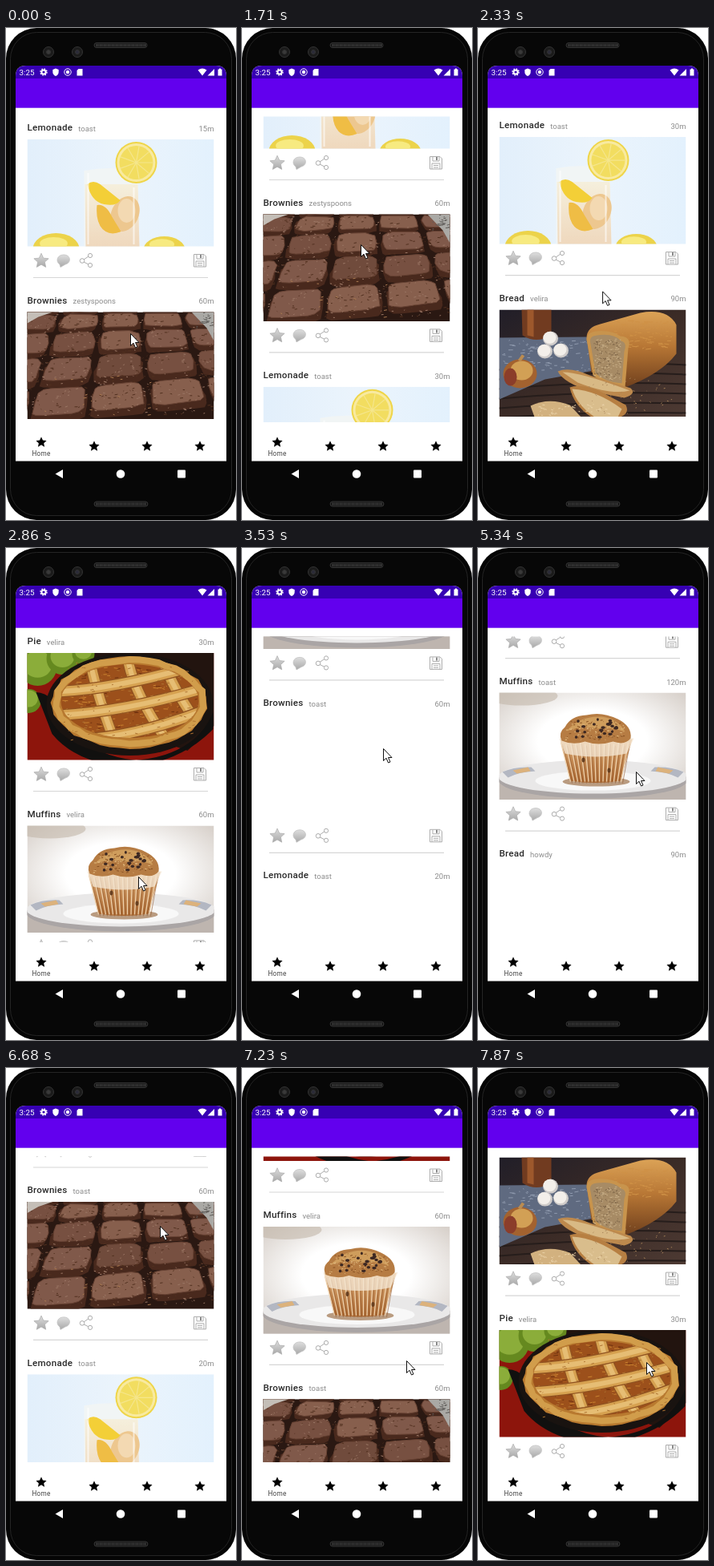
These frames come from a looping animation (287x614 px, 7990 ms). An HTML page:

```html
<!DOCTYPE html>
<html lang="en">
<head>
<meta charset="utf-8">
<title>Recipe feed</title>
<style>
  html, body { margin: 0; width: 100%; height: 100%; overflow: hidden; background: #fff; }
  svg { display: block; width: 287px; height: 614px; }
  text { font-family: Roboto, "Noto Sans", sans-serif; }
  .title { font-size: 11.6px; font-weight: 500; letter-spacing: .25px; fill: #2a2a2a; }
  .meta { font-size: 9.5px; font-weight: 400; letter-spacing: 0; fill: #8c8c8c; }
</style>
</head>
<body>
<svg viewBox="0 0 287 614" xmlns="http://www.w3.org/2000/svg">
  <defs>
    <clipPath id="listClip"><rect x="12" y="110.5" width="263" height="381.5"/></clipPath>
    <clipPath id="photoClip"><rect width="233" height="133.5"/></clipPath>
    <clipPath id="pieClip"><ellipse cx="128" cy="60" rx="86" ry="46"/></clipPath>
    <linearGradient id="silver" x2="0" y2="1"><stop stop-color="#dedede"/><stop offset="1" stop-color="#a8a8a8"/></linearGradient>
    <linearGradient id="sky"><stop stop-color="#e2effb"/><stop offset=".5" stop-color="#ebf4fc"/><stop offset="1" stop-color="#e3f1fd"/></linearGradient>
    <linearGradient id="drink" x2="0" y2="1"><stop stop-color="#f5efdc"/><stop offset="1" stop-color="#efd8bd"/></linearGradient>
    <radialGradient id="room" cy=".45" r=".65"><stop offset=".45" stop-color="#fff"/><stop offset="1" stop-color="#d8d1cb"/></radialGradient>
    <linearGradient id="wood" x2="1" y2="1"><stop stop-color="#211e28"/><stop offset=".5" stop-color="#3b2b26"/><stop offset="1" stop-color="#4d3a33"/></linearGradient>
    <linearGradient id="loaf" x2="0" y2="1"><stop stop-color="#dba256"/><stop offset=".45" stop-color="#b87735"/><stop offset="1" stop-color="#70401d"/></linearGradient>
    <linearGradient id="wrap" x2="0" y2="1"><stop stop-color="#dfae78"/><stop offset="1" stop-color="#a9662f"/></linearGradient>
    <path id="star" d="M0-1 .29-.36 .98-.29 .47 .17 .61 .85 0 .5-.61 .85-.47 .17-.98-.29-.29-.36Z"/>
    <g id="actions" fill="none" stroke="#adadad">
      <use href="#star" transform="translate(44 .5) scale(9.3)" fill="url(#silver)" stroke-width=".08"/>
      <path d="M67 5C62 2 63-7 72-7S82 3 74 5L68 8.5Z" fill="url(#silver)" stroke="#c2c2c2" stroke-width=".8"/>
      <path d="M97-1 103-5M97 2 103 5"/>
      <circle cx="95" cy=".5" r="2.8"/><circle cx="105" cy="-6" r="2.6"/><circle cx="105" cy="6" r="2.6"/>
      <path d="M234.500-7.500H247L249.500-5V8H234.500ZM238-7V-2H246V-7M237 8V1H247V8M239 3.500H245M239 6H245"/>
      <path d="M243-7V-3" stroke="#8a8a8a" stroke-width="2"/>
      <path d="M34 21.500H252" stroke="#d6d6d6" stroke-width="1.2"/>
    </g>
  </defs>

  <rect width="287" height="614" rx="38" fill="#050505"/>
  <rect x="5.500" y="5.500" width="276" height="603" rx="33" fill="#070707" stroke="#242424"/>
  <g fill="#1b1b1b" stroke="#333">
    <circle cx="53" cy="30" r="6.500"/><circle cx="89" cy="30" r="6.500"/>
    <circle cx="53" cy="30" r="2.500" fill="#3a3a3a"/><circle cx="89" cy="30" r="2.500" fill="#2b2b38"/>
    <rect x="110" y="18.500" width="66" height="6" rx="3"/><rect x="110" y="591" width="67" height="6" rx="3"/>
    <path d="M113 21.500H174M113 594H174" stroke="#484848" stroke-width="3" stroke-dasharray="1 1.5"/>
  </g>

  <path d="M12 540.500V60Q12 47 25 47H262Q275 47 275 60V540.500Z" fill="#fff"/>
  <path d="M12 63V60Q12 47 25 47H262Q275 47 275 60V63Z" fill="#3700b3"/>
  <rect x="12" y="63" width="263" height="36.700" fill="#6200ee"/>

  <g fill="#fff">
    <text x="16.500" y="58.600" font-size="9.800">3:25</text>
    <circle cx="47" cy="55" r="2.600" fill="none" stroke="#fff" stroke-width="2"/>
    <circle cx="47" cy="55" r="4" fill="none" stroke="#fff" stroke-width="1.500" stroke-dasharray="1.6 1.54"/>
    <path d="M62 50.500 65.700 52V55Q65.500 58.500 62 60 58.500 58.500 58.300 55V52Z"/>
    <circle cx="77" cy="55" r="4.200" fill="none" stroke="#fff"/><circle cx="77" cy="55" r="2.200"/>
    <path d="M90.500 51H95.500V59.500H88.500V53Z"/>
    <path d="M239.500 52.500Q245 48.500 250.500 52.500L245 59.500ZM251.500 59.500H260V51ZM264.500 51.500H266V50.500H268V51.500H269.500V59.500H264.500Z"/>
    <path d="M61.500 556.500 71 551V562Z"/><circle cx="143" cy="556.500" r="5.300"/><rect x="214" y="551.500" width="10" height="10" rx="1"/>
  </g>

  <g clip-path="url(#listClip)"><g id="feed"></g></g>
  <g id="tabs"></g>
  <text x="44" y="533.700" font-size="8.200" letter-spacing=".3" text-anchor="middle" fill="#444">Home</text>
  <path id="cursor" d="M.5 .5V15.500L4 12.200 6.500 18 9 17 6.500 11.500H11Z" fill="#fff" stroke="#111" stroke-linejoin="round"/>
</svg>

<script>
const LOOP = 7990, FIRST_BEAT = 645, BEAT = 130.3, PITCH = 215.4;
const $ = id => document.getElementById(id);
const lerp = (a, b, k) => a + (b - a) * k;
const smooth = k => k * k * (3 - 2 * k);

let seed = 7;
const rnd = () => (seed = seed * 16807 % 2147483647) / 2147483647;
const span = (a, b) => lerp(a, b, rnd());

const repeat = (n, make) => Array.from({ length: n }, (_, i) => make(i)).join('');
const oval = (x, y, rx, ry, fill, more = '') => `<ellipse cx="${x}" cy="${y}" rx="${rx}" ry="${ry}" fill="${fill}" ${more}/>`;
const shape = (d, fill, more = '') => `<path d="${d}" fill="${fill}" ${more}/>`;
const line = (d, color, width, more = '') => shape(d, 'none', `stroke="${color}" stroke-width="${width}" ${more}`);
const back = fill => shape('M0 0H233V134H0Z', fill);
const specks = (n, x0, y0, x1, y1, color, size) => line(
  repeat(n, () => `M${span(x0, x1).toFixed(1)} ${span(y0, y1).toFixed(1)}l${span(.5, size).toFixed(1)} ${span(-1, 1).toFixed(1)}`),
  color, 1);

// an ellipse with a ragged edge
function blob(x, y, rx, ry, rough, fill, more) {
  const points = Array.from({ length: 48 }, (_, i) => {
    const a = i / 48 * Math.PI * 2, r = span(1 - rough, 1 + rough);
    return `${(x + Math.cos(a) * rx * r).toFixed(1)} ${(y + Math.sin(a) * ry * r).toFixed(1)}`;
  });
  return shape(`M${points.join('L')}Z`, fill, more);
}

function lemonSlice(x, y, r) {
  const spokes = repeat(9, i => {
    const a = i * Math.PI * 2 / 9;
    return `M${x} ${y}l${(Math.cos(a) * r * .8).toFixed(1)} ${(Math.sin(a) * r * .8).toFixed(1)}`;
  });
  return oval(x, y, r, r, '#efd548') + oval(x, y, r - 2, r - 2, '#f8eaa0') +
    oval(x, y, r - 5, r - 5, '#f2dd60') + line(spokes, '#f5e68c', 1.2);
}

function lemonade() {
  const lemon = (x, y, rx, ry) => oval(x, y, rx, ry, '#ecd34a') + oval(x - 3, y - 7, rx * .6, ry * .4, '#f7ea80');
  return back('url(#sky)') + lemon(36, 137, 29, 20) + lemon(171, 138, 26, 17) +
    shape('M71 39Q104 33 138 39L140 134H71Z', '#f1f5f5') +
    shape('M72 56H138L140 134H73Z', 'url(#drink)') +
    oval(122, 93, 17, 23, '#edc78f', 'transform="rotate(25 122 93)"') + oval(124, 89, 11, 15, '#f3d9b2') +
    shape('M75 56Q82 50 91 56L116 76Q111 84 96 81 80 78 75 56Z', '#f3cf37') +
    shape('M87 82Q98 80 106 97L117 115Q103 121 94 112 85 102 87 82Z', '#efbd45') +
    line('M76 42V131M133 60V131', '#fff', 2, 'opacity=".6"') + lemonSlice(136, 29, 26);
}

function brownies() {
  const at = (u, v) => {
    const depth = (v / 5) ** 1.6, x = lerp(45 + u * 48, -4 + u * 78, depth);
    return [x, lerp(lerp(-7, 142, depth), lerp(-9, 118, depth), x / 233)];
  };
  const block = (u, v, r, fill, more) => {
    const points = Array.from({ length: 14 }, (_, i) => {
      const a = i / 14 * Math.PI * 2, square = n => Math.sign(n) * Math.abs(n) ** .4;
      const [x, y] = at(u + square(Math.cos(a)) * r, v + square(Math.sin(a)) * r * .9);
      return `${(x + span(-1.8, 1.8)).toFixed(1)} ${(y + span(-1.2, 1.2)).toFixed(1)}`;
    });
    return shape(`M${points.join('L')}Z`, fill, more);
  };
  const tones = ['#80594a', '#775041', '#875f4d', '#704b3c'];
  let art = back('#2a1812');
  for (let v = 0; v < 5; v++) for (let u = -2; u < 5; u++) {
    art += block(u + .5, v + .6, .46, '#49291d') +
      block(u + .5, v + .4, .43, tones[Math.floor(rnd() * 4)], 'stroke-linejoin="round" stroke="#684334"');
  }
  return art + specks(260, 0, 3, 230, 130, '#9b7765', 3) + specks(300, 0, 3, 230, 130, '#51301f', 4) +
    specks(18, 15, 80, 170, 130, '#aa7a50', 4) +
    shape('M0 0H32L14 6 0 14Z', '#c4beb7') + shape('M205 0H233V36L224 20Z', '#aaa9a5') + specks(25, 210, 0, 231, 22, '#5d5a57', 5);
}

function pie() {
  const strip = d => line(d, '#8f5220', 15) + line(d, '#d6a150', 12.5) + line(d, '#e6bd74', 6);
  const apple = (x, y, r) => oval(x, y, r, r, '#65891f') + oval(x, y - 3, r * .75, r * .7, '#8bad3a');
  return back('#8d150c') + shape('M80 0H233V91L200 122 80 80Z', '#22140f') +
    apple(2, 60, 15) + apple(13, 17, 24) + apple(44, 7, 20) + apple(70, 1, 14) +
    shape('M11 49Q34 50 45 83 75 128 136 134 211 127 232 73V95Q195 134 130 143 62 139 31 101Z', '#11100f') +
    oval(128, 64, 104, 64, '#191310') + blob(128, 62, 97, 57, .02, '#b8792f') +
    blob(128, 61, 92, 52, .02, 'none', 'stroke="#d19d4b" stroke-width="8"') +
    oval(128, 60, 86, 46, '#9c501b') +
    `<g clip-path="url(#pieClip)">` + specks(150, 42, 16, 214, 105, '#c9822f', 7) + specks(110, 42, 16, 214, 105, '#6e300e', 6) +
    strip('M78 8Q86 50 111 116') + strip('M125 5Q132 48 172 106') + strip('M170 11Q180 40 207 80') +
    strip('M42 48Q106 45 199 19') + strip('M35 78Q121 74 224 43') + strip('M64 108Q133 105 218 73') +
    '</g>' + specks(110, 45, 12, 212, 110, '#ae7332', 4);
}

function muffins() {
  const pleats = repeat(15, i => `M${77 + i * 6} ${62 + i % 2 * 2}L${89 + i * 4.5} 111`);
  const rim = shape('M4 99Q19 92 40 93L45 98Q24 99 11 106Z', '#b3b7c2') + shape('M17 97 36 93 39 98 22 101Z', '#dcb27c');
  return back('url(#room)') + oval(28, 4, 45, 12, '#c4b7aa', 'opacity=".6"') +
    shape('M0 108H233V134H0Z', '#beb5af') +
    oval(117, 109, 118, 23, '#aaa5a5') + oval(117, 105, 118, 21, '#e9e8e8') +
    rim + `<g transform="translate(234) scale(-1 1)">${rim}</g>` +
    oval(117, 110, 72, 12, '#f8f8f8') + oval(121, 111, 42, 6, '#b99b80') +
    shape('M76 58H166L151 110Q120 115 89 110Z', 'url(#wrap)') + line(pleats, '#eccfaa', 1.3) +
    line(pleats, '#92592e', .6, 'transform="translate(2 2)"') +
    shape('M75 57H168L159 76Q120 84 82 76Z', '#f4e7d5', 'opacity=".75"') +
    shape('M78 60Q73 50 82 43 89 29 109 28 128 23 148 33 166 42 164 57 157 66 142 61 124 67 107 61 92 66 78 60Z', '#b67c43') +
    shape('M84 48Q101 28 128 30 149 33 157 49 140 42 122 45 104 40 84 48Z', '#cf9d5c') +
    specks(65, 82, 38, 157, 59, '#dfb77d', 3) + specks(50, 84, 34, 155, 60, '#875022', 3) +
    repeat(22, () => oval(span(94, 151).toFixed(1), span(32, 57).toFixed(1), span(1.3, 3).toFixed(1), 1.8, '#3d2822')) +
    oval(105, 84, 2, 3, '#684021') + oval(137, 97, 2, 3, '#684021');
}

function bread() {
  const egg = (x, y) => oval(x, y, 9.5, 9, '#cfcbc9') + oval(x - 1, y - 1, 8, 7.5, '#f3efea');
  return back('url(#wood)') +
    line(repeat(7, i => `M0 ${75 + i * 12}Q116 ${62 + i * 13} 233 ${69 + i * 12}`), '#261d1b', 2) +
    shape('M0 35 111 34 129 74 57 87 0 112Z', '#5f6a80') + specks(90, 0, 38, 112, 80, '#8f9aae', 6) +
    shape('M28 0H65V32Q46 43 29 32Z', '#713b20') + shape('M35 0H43V34L35 32Z', '#9d582c') +
    egg(64, 36) + egg(57, 52) + egg(77, 51) +
    oval(26, 80, 21, 18, '#a3622f') + oval(28, 76, 14, 12, '#d2a055') + oval(14, 84, 8, 11, '#8b3d2a') + line('M25 64 30 57', '#ba8c51', 4) +
    shape('M110 42Q105 23 126 18L176 4Q210-2 221 19L221 55Q202 80 157 97L115 78Z', 'url(#loaf)') +
    specks(90, 135, 14, 215, 50, '#cf9146', 7) +
    shape('M110 42Q106 29 120 27 139 25 151 33 166 34 161 48L157 97Q132 94 117 82Z', '#c8944d') +
    shape('M114 43Q111 33 122 32 143 29 152 39 160 41 156 52L153 92Q130 90 120 79Z', '#a78b65') +
    specks(130, 118, 37, 151, 87, '#c7ae87', 3) + specks(90, 118, 37, 151, 84, '#765e43', 2) +
    shape('M73 77Q88 71 113 82L164 98Q172 105 156 110L114 102Q80 91 73 77Z', '#bd894d') + shape('M79 78Q102 78 163 101 139 107 98 91Z', '#d8b985') +
    shape('M88 97Q101 92 124 101L158 119Q163 130 151 134H115Q93 120 88 97Z', '#b77f42') + shape('M91 99Q123 101 153 124L148 134H119Q97 119 91 99Z', '#d9bd8c') +
    shape('M39 120Q62 109 88 119L102 134H44Z', '#d2b17f') + specks(50, 48, 118, 145, 132, '#ead2a8', 3) +
    specks(45, 105, 85, 215, 130, '#a68258', 2);
}

const photos = { Lemonade: lemonade, Brownies: brownies, Pie: pie, Muffins: muffins, Bread: bread };
const posts = [
  ['Lemonade', 'toast', 15], ['Brownies', 'zestyspoons', 60], ['Lemonade', 'toast', 30],
  ['Bread', 'velira', 90], ['Pie', 'velira', 30], ['Muffins', 'velira', 60],
  ['Brownies', 'toast', 60], ['Lemonade', 'toast', 20], ['Brownies', 'toast', 30],
  ['Muffins', 'toast', 120], ['Bread', 'howdy', 90]
];
// the first six photos are ready, later ones arrive in pairs
const loadBeat = i => i < 6 ? -1 : 25 + 6 * Math.floor((i - 6) / 2);

document.querySelector('defs').insertAdjacentHTML('beforeend',
  Object.entries(photos).map(([name, draw]) => `<g id="${name}" clip-path="url(#photoClip)">${draw()}</g>`).join(''));

$('feed').innerHTML = posts.map(([title, author, minutes], i) => `<g transform="translate(0 ${(124 + i * PITCH).toFixed(1)})">
  <text x="26.5" y="4.2" class="title">${title}<tspan class="meta" dx="7" dy=".8">${author}</tspan></text>
  <text x="259.5" y="5" class="meta" text-anchor="end">${minutes}m</text>
  <use class="photo" href="#${title}" x="26.5" y="15"/>
  <use href="#actions" y="166"/></g>`).join('');
const photoNodes = [...document.querySelectorAll('.photo')];

$('tabs').innerHTML = repeat(4, i => `<use href="#star" transform="translate(${44 + i * 66} ${i ? 522 : 517}) scale(6.7)"/>`);

// swipe turning points, in beats
const scrollKeys = [[4, 0], [8, 122], [17, 869.6], [28, 1689], [36, 1897], [37, 1963], [38, 1963], [46, 1264.5], [55, 673.6]];
const cursorKeys = [
  [-1, 155, 381], [1, 146, 417], [4, 143, 421], [8, 148, 270], [17, 165, 410], [22, 176, 250], [28, 189, 378],
  [36, 197, 279], [38, 179, 192], [42, 190, 350], [46, 192, 197], [50, 205, 365], [55, 210, 367]
];

function sample(keys, beat) {
  const next = keys.findIndex(key => key[0] > beat);
  if (next < 1) return keys.at(next).slice(1);
  const [from, ...a] = keys[next - 1], [to, ...b] = keys[next];
  return a.map((n, i) => lerp(n, b[i], smooth((beat - from) / (to - from))));
}

let shown;
function render() {
  const now = performance.now() % LOOP;
  const beat = Math.max(-1, Math.floor((now - FIRST_BEAT) / BEAT));
  if (beat !== shown) {
    shown = beat;
    const [offset] = sample(scrollKeys, beat), [x, y] = sample(cursorKeys, beat);
    $('feed').setAttribute('transform', `translate(0 ${-offset})`);
    $('cursor').setAttribute('transform', `translate(${x} ${y})`);
    photoNodes.forEach((node, i) => node.setAttribute('visibility', beat >= loadBeat(i) ? 'visible' : 'hidden'));
  }
  requestAnimationFrame(render);
}
render();
</script>
</body>
</html>
```
